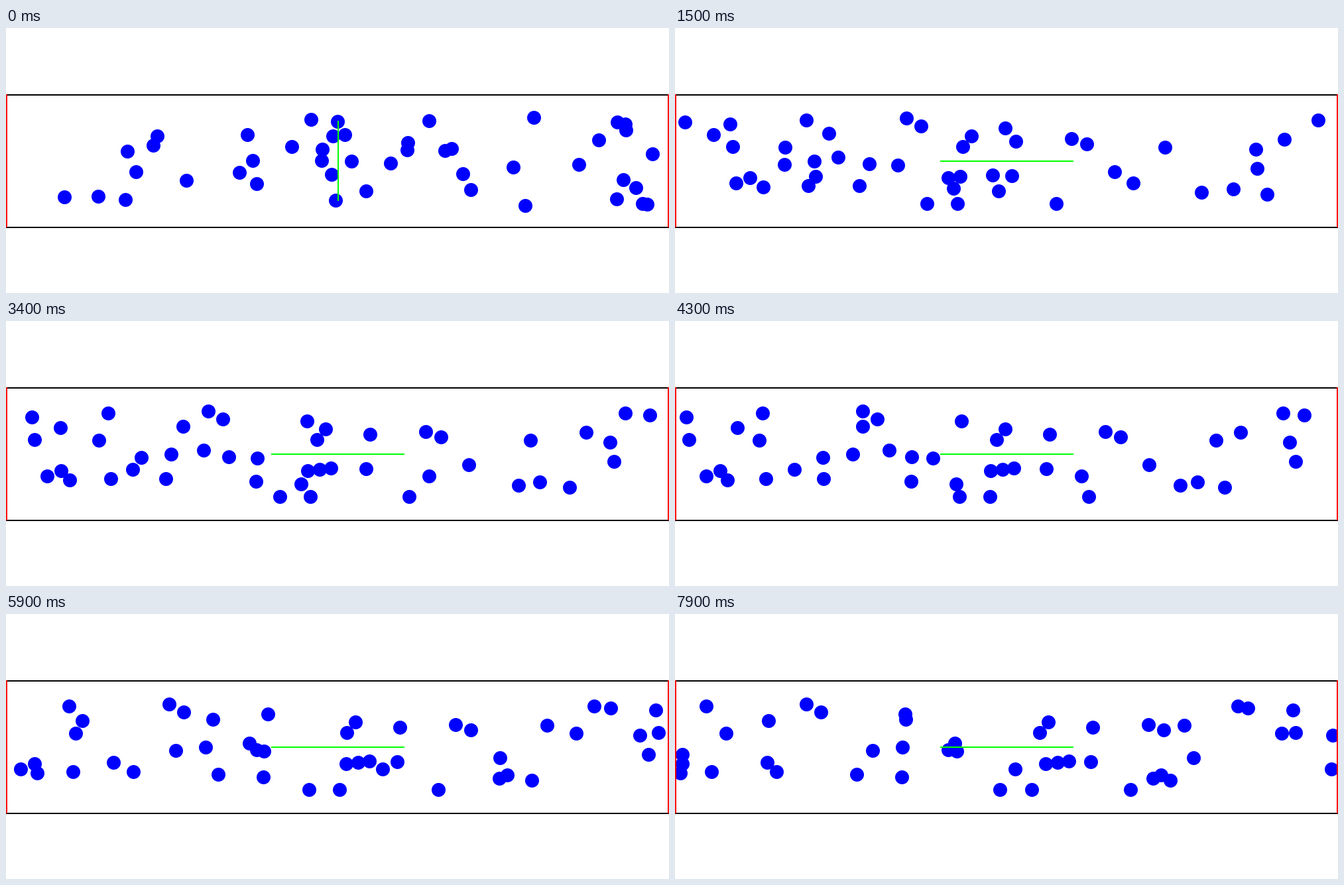
Animation of 1000x400 px, one loop 8 s. Source, as a matplotlib script:

```python
import numpy as np
import matplotlib.pyplot as plt
from matplotlib.animation import FuncAnimation
from matplotlib.patches import Rectangle

W, H, DPI = 1000, 400, 100
FRAMES, STEP_MS = 80, 100
RADIUS = 10.5
CYCLE, SHUT, SHUT_AT = 45, 15, 18     # gate timing in steps
GAP, LANE = 12, 8                     # queue spacing along and across a lane
OPEN_BOX = (400, 200, 201, 2)
SHUT_BOX = (500, 140, 2, 121)

# Streams of walkers: speed per step, height of first and last, starting x
STREAMS = [
    (1.75, 264, 264, [355, 401, 550]),
    (1.82, 158, 182, [206, 421, 572, 488, 595, 408, 850]),
    (2.08, 200, 211, [180, 135, 848]),
    (2.30, 204, 206, [260, 303]),
    (2.30, 225, 221, [379, 397, 446]),
    (1.87, 222, 216, [481, 636]),
    (2.75, 194, 179, [207, 700]),
    (1.30, 160, 160, [39]),
    (-2.36, 135, 150, [382, 231, 48, 116, 404, 531]),
    (-2.36, 167, 178, [952, 120]),
    (-2.78, 233, 233, [729]),
    (-1.89, 138, 138, [996]),
    (-2.29, 237, 250, [233, 452, 520, 925]),
    (-1.95, 237, 242, [305, 160, 869]),
    (-1.60, 225, 233, [135, 114]),
    (-1.39, 179, 179, [185]),
    (-1.15, 223, 247, [228, 810]),
]


def gate_shut(step):
    return step == 0 or (step - SHUT_AT) % CYCLE < SHUT


def at_gate(x, y, v, step):
    """Walkers whose next step would run into the end of the gate bar."""
    left, top, w, h = SHUT_BOX if gate_shut(step) else OPEN_BOX
    near = np.where(v > 0, left, left + w)
    room = np.sign(v) * (near - x) - RADIUS
    level = (y > top - 6) & (y < top + h + 6)
    return level & (room >= 0) & (room < abs(v))


def in_queue(x, y, v):
    """Walkers close behind another one going the same way."""
    ahead = (np.sign(v)[:, None] * (x[None] - x[:, None])) % W
    same_lane = abs(y[None] - y[:, None]) < LANE
    same_way = v[None] * v[:, None] > 0
    return ((ahead > 0) & (ahead < GAP) & same_lane & same_way).any(axis=1)


def simulate():
    v = np.concatenate([[s] * len(xs) for s, _, _, xs in STREAMS])
    y = np.concatenate([np.linspace(a, b, len(xs)) for _, a, b, xs in STREAMS])
    x = np.concatenate([xs for *_, xs in STREAMS]).astype(float)

    # The crowd stands scattered for one step, then walks in lanes
    rng = np.random.default_rng(4)
    states = [np.column_stack([rng.uniform(8, 990, x.size),
                               rng.uniform(129, 271, x.size)])]
    for step in range(1, FRAMES):
        states.append(np.column_stack([x, y]))
        held = at_gate(x, y, v, step) | in_queue(x, y, v)
        x = (x + np.where(held, 0, v)) % W
    return np.floor(states) + 0.5


STATES = simulate()

fig = plt.figure(figsize=(W / DPI, H / DPI), dpi=DPI, facecolor="white")
ax = fig.add_axes([0, 0, 1, 1])
ax.set(xlim=(0, W), ylim=(H, 0))
ax.axis("off")


def bar(x, y, w, h, color):
    return ax.add_patch(Rectangle((x, y), w, h, fc=color, lw=0,
                                  antialiased=False, zorder=3))


for top in (100, 300):
    bar(0, top, W, 2, "#000000")
for left in (0, W - 2):
    bar(left, 100, 2, 201, "#ff0000")
shut_bar = bar(*SHUT_BOX, "#00ff00")
open_bar = bar(*OPEN_BOX, "#00ff00")

dots = ax.scatter(*STATES[0].T, s=(2 * RADIUS * 72 / DPI) ** 2, c="#0000ff",
                  linewidths=0, antialiased=False, zorder=2)


def draw(step):
    dots.set_offsets(STATES[step])
    shut = gate_shut(step)
    shut_bar.set_visible(shut)
    open_bar.set_visible(not shut)
    return dots, shut_bar, open_bar


anim = FuncAnimation(fig, draw, frames=FRAMES, init_func=lambda: draw(0),
                     interval=STEP_MS, repeat=True, repeat_delay=0)
plt.show()
```
